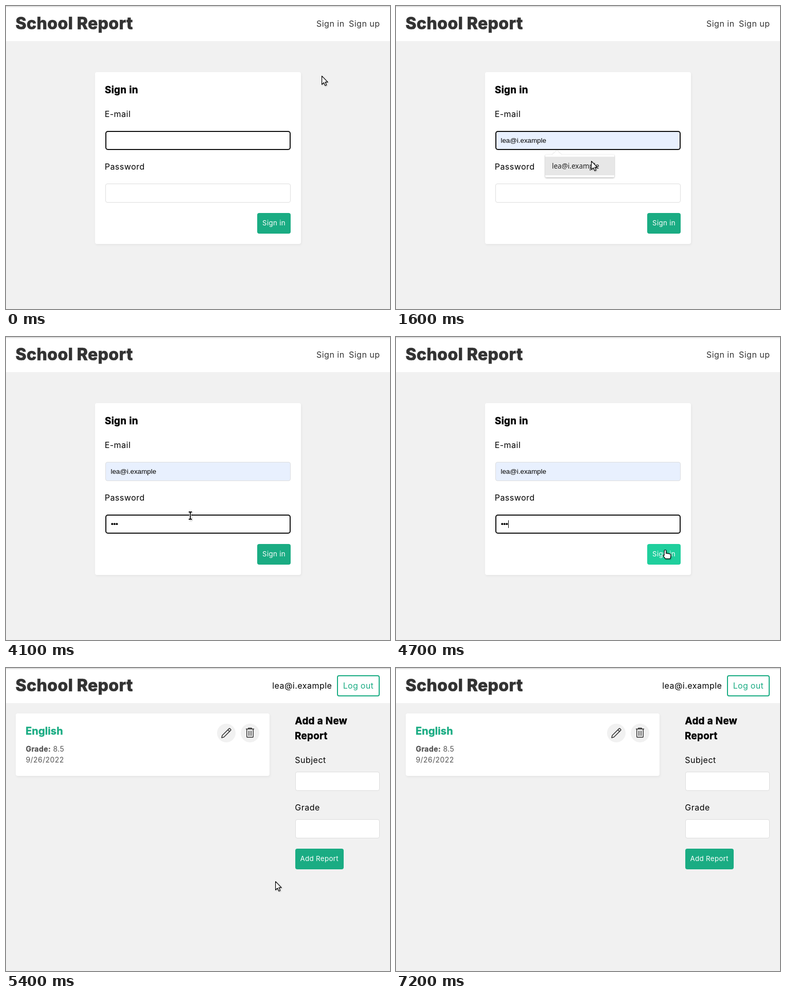
Recreate the animation shown at these times as an HTML page. Size 746x587 px, loop 7400 ms.

```html
<!DOCTYPE html>
<html lang="en">
<head>
<meta charset="utf-8">
<title>School Report</title>
<style>
  html, body { margin: 0; width: 100%; height: 100%; overflow: hidden; background: #f1f1f1; }
  svg { display: block; width: 746px; height: 587px; }
  text { font: 16px Inter, "Open Sans", sans-serif; letter-spacing: .03em; white-space: pre; }
  .title { font-size: 32px; font-weight: 800; letter-spacing: .42px; fill: #333; stroke: #333; stroke-width: .7; }
  .title.over { fill: #555; stroke: #555; }
  .h3 { font-size: 18.72px; font-weight: 700; letter-spacing: .4px; stroke: #000; stroke-width: .5; }
  .link { fill: #333; }
  .btn-text { font-size: 13.333px; letter-spacing: .025em; fill: #fff; }
  .small { font-size: 14px; fill: #555; }
  .bold { font-weight: 700; stroke: #555; stroke-width: .3; }
  .subject { font-size: 20px; font-weight: 700; letter-spacing: .15px; fill: #1aac83; stroke: #1aac83; stroke-width: .4; }
  .logout { letter-spacing: .3px; fill: #1aac83; }
  .field { font: 13.333px "Liberation Sans", Arial, sans-serif; letter-spacing: 0; }
  .option { font: 13.5px "Noto Sans", sans-serif; letter-spacing: 0; fill: #222; }
  .card { fill: #fff; filter: drop-shadow(1px 2px 2px rgba(0,0,0,.05)); }
  .btn { fill: #1aac83; }
  .btn.over { fill: #1fcf9d; }
  .input { fill: #fff; stroke: #ddd; }
  .ring { fill: none; stroke: #101010; stroke-width: 2; }
  .popup { filter: drop-shadow(0 1px 1.5px rgba(0,0,0,.35)); fill: #fff; }
  .icon { fill: none; stroke: #333; stroke-width: 1.5; stroke-linejoin: round; }
  .cursor { filter: drop-shadow(1px 1px 1px rgba(0,0,0,.3)); }
  .cursor path { fill: #fff; stroke: #000; stroke-width: 1.2; stroke-linejoin: round; }
</style>
</head>
<body>
<svg viewBox="0 0 746 587">
  <defs>
    <linearGradient id="edge" x2="0" y2="1">
      <stop offset="0" stop-color="#cfcfcf"/>
      <stop offset="1" stop-color="#fff"/>
    </linearGradient>
  </defs>
  <rect width="746" height="587" fill="#f1f1f1"/>
  <rect width="746" height="68" fill="#fff"/>
  <rect width="746" height="3" fill="url(#edge)"/>
  <text class="title" id="title" x="18.5" y="45">School Report</text>

  <g id="login">
    <text class="link" x="603" y="40">Sign in</text>
    <text class="link" x="666" y="40">Sign up</text>
    <rect class="card" x="173" y="128" width="400" height="333" rx="4"/>
    <text class="h3" x="192" y="169">Sign in</text>
    <text x="191.7" y="215">E-mail</text>
    <rect class="input" id="mailBox" x="193.5" y="242.5" width="359" height="36" rx="3.5"/>
    <rect class="ring" id="mailRing" x="194" y="243" width="358" height="35" rx="4"/>
    <text class="field" id="mail" x="203.5" y="265"></text>
    <text x="191.7" y="317">Password</text>
    <rect class="input" x="193.5" y="344.5" width="359" height="36" rx="3.5"/>
    <rect class="ring" id="passRing" x="194" y="345" width="358" height="35" rx="4"/>
    <g id="dots">
      <circle cx="206.3" cy="362.3" r="2"/>
      <circle cx="210.8" cy="362.3" r="2"/>
      <circle cx="215.3" cy="362.3" r="2"/>
    </g>
    <rect id="caret" width="1" height="15"/>
    <rect class="btn" id="submit" x="488" y="401" width="65" height="40" rx="4"/>
    <text class="btn-text" x="498" y="425">Sign in</text>
    <g id="popup">
      <g class="popup">
        <path d="M303 288.5L312.5 280L322 288.5Z"/>
        <rect id="list" x="290" y="288" rx="2"/>
      </g>
      <rect id="option" x="290" y="292" width="134" height="36" fill="#e7e7e7"/>
      <text class="option" x="303" y="315">lea@i.example</text>
      <text class="option" id="second" x="303" y="351">lia@in.example</text>
    </g>
  </g>

  <g id="home">
    <text x="633.4" y="40" text-anchor="end">lea@i.example</text>
    <rect x="644" y="15" width="81" height="39" rx="3" fill="#fff" stroke="#1aac83" stroke-width="2"/>
    <text class="logout" x="654.7" y="40">Log out</text>
    <rect class="card" x="19" y="88" width="493" height="121" rx="4"/>
    <text class="subject" x="38" y="129">English</text>
    <text class="small bold" x="38.5" y="162">Grade:</text>
    <text class="small" x="91.5" y="162">8.5</text>
    <text class="small" x="38.5" y="183">9/26/2022</text>
    <circle cx="428" cy="126" r="18" fill="#f1f1f1"/>
    <path class="icon" d="M419 135l1-4.2L433.4 117.4Q434.2 116.6 435 117.4L436.6 119Q437.4 119.8 436.6 120.6L423.2 134ZM431 119.8l3.2 3.2"/>
    <circle cx="474" cy="126" r="18" fill="#f1f1f1"/>
    <path class="icon" d="M466 118.3h16M470.8 118v-1.4h6.4v1.4M467.8 118.5v14.6q0 1.2 1.2 1.2h10q1.2 0 1.2-1.2v-14.6M472 121.5v10M476 121.5v10"/>
    <text class="h3" x="561.5" y="109">Add a New</text>
    <text class="h3" x="561" y="138">Report</text>
    <text x="561.3" y="184">Subject</text>
    <rect class="input" x="562.5" y="201.5" width="163" height="36" rx="3.5"/>
    <text x="561.3" y="276">Grade</text>
    <rect class="input" x="562.5" y="293.5" width="163" height="36" rx="3.5"/>
    <rect class="btn" x="562" y="350" width="94" height="40" rx="4"/>
    <text class="btn-text" x="571.5" y="374">Add Report</text>
  </g>

  <g class="cursor" id="cursor">
    <path id="arrow" d="M.6 .6V17L4.4 13.4L7 19.2L9.6 18L7.1 12.4H12Z"/>
    <g id="beam" fill="none">
      <path d="M-3-7H-1L0-6L1-7H3M0-6V6M-3 7H-1L0 6L1 7H3" style="fill:none;stroke:#fff;stroke-width:4"/>
      <path d="M-3-7H-1L0-6L1-7H3M0-6V6M-3 7H-1L0 6L1 7H3" style="fill:none;stroke:#000;stroke-width:1.8"/>
    </g>
    <path id="hand" d="M-1.8 1.3a1.8 1.8 0 0 1 3.6 0V6.6c.5-1 2.9-.9 3.1.4.6-1 2.8-.7 3 .5.8-.7 2.9-.3 2.9 1.1V12c0 2-1 2.6-1.2 4.6H.2c-.4-1.8-2.4-3.2-3.9-5.2-.9-1.5.7-2.5 1.9-1.3Z"/>
  </g>
</svg>
<script>
  const LOOP = 7400, STEP = 100, EMAIL = 'lea@i.example';
  const el = id => document.getElementById(id);
  const show = (id, on) => { el(id).style.display = on ? '' : 'none'; };
  const set = (id, attrs) => { for (const k in attrs) el(id).setAttribute(k, attrs[k]); };
  const within = (t, a, b) => t >= a && t < b;
  const dots = [...el('dots').children];

  // time, x, y of the pointer's hot spot
  const path = [
    [0, 613, 135], [1100, 613, 135], [1200, 604, 141], [1300, 556, 182], [1400, 468, 250],
    [1500, 398, 294], [1600, 379, 300], [1700, 379, 300], [1800, 374, 309], [1900, 358, 328],
    [2000, 334, 351], [2200, 298, 351], [2300, 292, 349], [3800, 292, 349], [3900, 302, 348],
    [4100, 358, 346], [4300, 445, 368], [4500, 512, 405], [4600, 523, 413], [5400, 523, 413],
    [5500, 502, 398], [5700, 345, 282], [5900, 204, 180], [6000, 189, 168], [6200, 160, 155],
    [6800, 160, 155], [6900, 163, 115], [7000, 170, 42], [7100, 176, 4], [7200, 178, -30], [7400, 178, -30]
  ];

  function pointer(t) {
    const i = path.findIndex(p => p[0] > t);
    const [t0, x0, y0] = path[i - 1], [t1, x1, y1] = path[i];
    const k = (t - t0) / (t1 - t0);
    return [x0 + (x1 - x0) * k, y0 + (y1 - y0) * k];
  }

  function drawMail(t) {
    const typed = [400, 500, 700].filter(at => t >= at).length;
    const filled = t >= 1500;
    el('mail').textContent = filled ? EMAIL : EMAIL.slice(0, typed);
    el('mailBox').style.fill = filled ? '#e8f0fe' : '#fff';
    show('mailRing', t < 2400);

    const wide = t < 500;
    show('popup', within(t, 400, 1800));
    show('second', wide);
    show('option', t >= 1500);
    set('list', { width: wide ? 146 : 134, height: wide ? 80 : 44 });
    return typed;
  }

  function drawPassword(t) {
    const typed = [3100, 3300, 3500].filter(at => t >= at).length;
    dots.forEach((dot, i) => { dot.style.display = i < typed ? '' : 'none'; });
    show('passRing', within(t, 2400, 5000));
    return typed;
  }

  function drawCaret(t, letters, bullets) {
    const inPass = t >= 2400;
    const inMail = within(t, 400, 1200) || within(t, 1800, 2300);
    const blink = within(t, 2400, 2900) || within(t, 3100, 4000) || within(t, 4700, 5000);
    show('caret', inPass ? blink : inMail);
    set('caret', inPass
      ? { x: Math.round(204 + bullets * 4.6), y: 355 }
      : { x: t >= 1800 ? 292 : [204, 207, 214, 221][letters], y: 253 });
  }

  function drawCursor(t) {
    const [x, y] = pointer(t);
    const beam = within(t, 2000, 4400);
    const hand = within(t, 4500, 5200) || within(t, 7000, 7100);
    show('beam', beam);
    show('hand', hand);
    show('arrow', !beam && !hand);
    set('cursor', { transform: `translate(${Math.round(x)} ${Math.round(y)})` });
  }

  function draw(now) {
    const t = Math.floor((now % LOOP) / STEP) * STEP;
    show('login', t < 5200);
    show('home', t >= 5200);
    drawCaret(t, drawMail(t), drawPassword(t));
    el('submit').classList.toggle('over', t >= 4500);
    el('title').classList.toggle('over', within(t, 7000, 7100));
    drawCursor(t);
  }

  const start = performance.now();
  function tick() {
    draw(performance.now() - start);
    requestAnimationFrame(tick);
  }
  tick();
</script>
</body>
</html>
```
